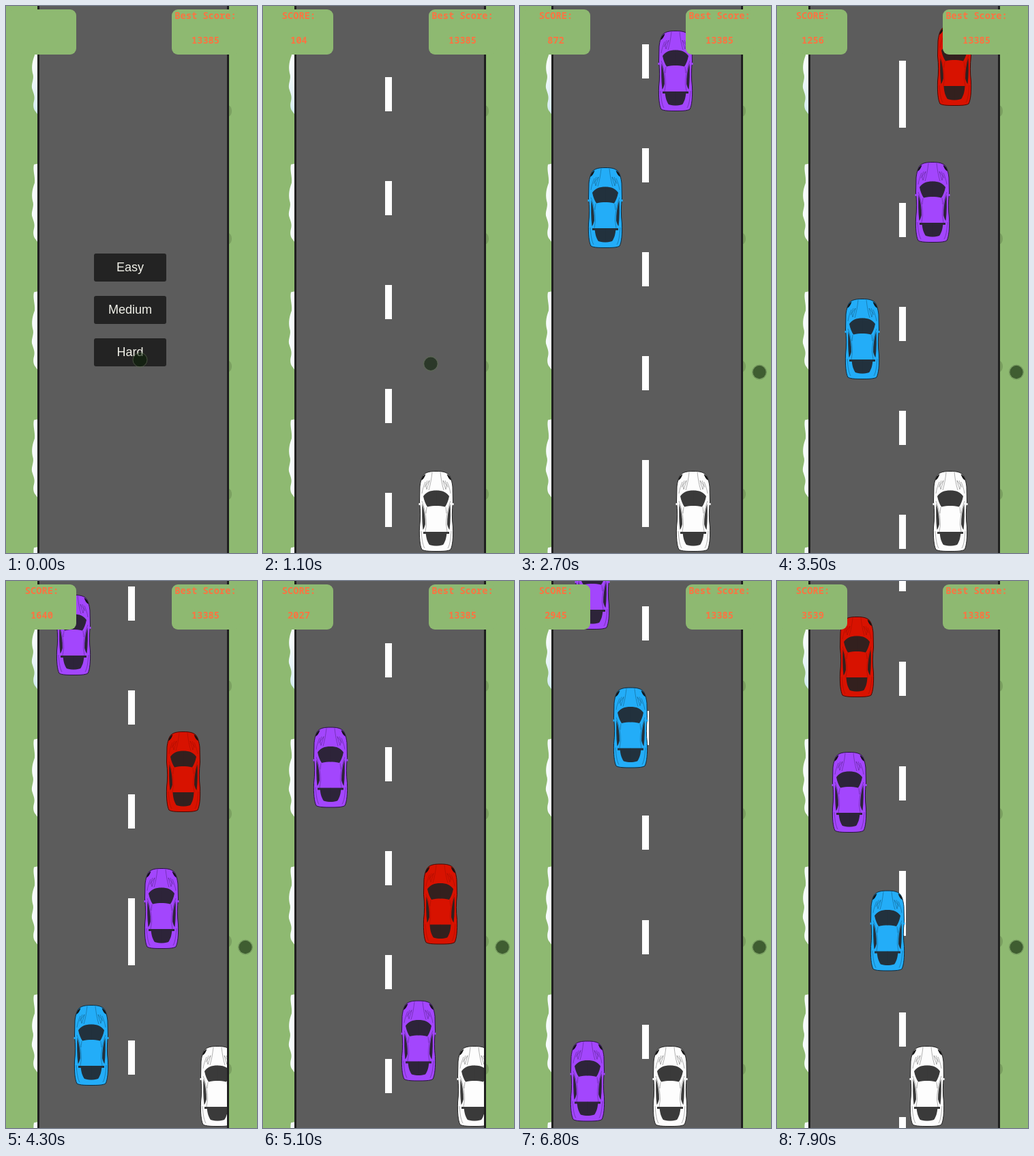
An HTML page with a canvas for the animation above (8000 ms loop, 368x800 px).

```html
<!DOCTYPE html>
<html lang="en">
<head>
<meta charset="utf-8">
<title>Road game</title>
<style>
html, body { margin: 0; width: 100%; height: 100%; overflow: hidden; background: #8eb971; }
canvas { display: block; width: 368px; height: 800px; }
</style>
</head>
<body>
<canvas id="stage" width="368" height="800"></canvas>
<script>
const ctx = document.getElementById('stage').getContext('2d');
const LOOP = 8000, START = 883, FPS = 60;
const GRASS = '#8eb971', ROAD = '#5c5c5c', EDGE = '#1f1f1f';
const MONO = 'bold 13.7px "Noto Sans Mono", "DejaVu Sans Mono", monospace';
const SANS = '18px "Liberation Sans", Arial, sans-serif';

const BLUE = { body: '#23adf8', glass: '#22313d', line: '#0b2b40' };
const PURPLE = { body: '#a346fd', glass: '#2d2439', line: '#2a1142' };
const RED = { body: '#d81200', glass: '#33201e', line: '#4a0800', plain: true };
const WHITE = { body: '#fdfdfd', glass: '#3a3a3a', line: '#222' };

// Rivals: paint, x on the first pass, x after coming round again
const RIVALS = [[BLUE, 100, 137], [PURPLE, 203, 81], [RED, 235, 92], [PURPLE, 74, 74]];

// Right half of a car, measured from the middle of its nose
const SHAPE = {
  body: new Path2D('M0 .5C9 .5 14 1.5 18 5C21.5 9 23 15 24 23L24.5 45C23 58 23 70 24.5 82C25 98 24 109 21 115C17 117.5 8 117.5 0 117.5C-8 117.5 -17 117.5 -21 115C-24 109 -25 98 -24.5 82C-23 70 -23 58 -24.5 45L-24 23C-23 15 -21.5 9 -18 5C-14 1.5 -9 .5 0 .5Z'),
  lamp: new Path2D('M15.5 4.5C19 6 21 9 22 14C19 12.5 17 9 15.5 4.5Z'),
  front: new Path2D('M-.2 28.5C9 28.5 15 31 19 37C17.5 44 15.5 49 13 52.5C8 51.3 4 51 -.2 51Z'),
  side: new Path2D('M20.5 48C21 60 21 74 19.5 86C18.5 85 17 82 16 78C16 68 17.5 57 20.5 48Z'),
  rear: new Path2D('M-.2 89H15.5C15 98 13 104 10 108C6 109.5 3 109.5 -.2 109.5Z'),
  hood: new Path2D('M6 2C7 11 8.5 20 11 28M10 14L15 21L14 27L11 18ZM13 14L17 24M16 16C18 21 20 26 21 33'),
  seams: new Path2D('M21 44C18 52 15 62 14.5 78L16 89M14 53L15 62M22 88C21 100 20 108 17 113')
};

const clamp = (v, lo, hi) => Math.min(hi, Math.max(lo, v));

function box(x, y, w, h, r, fill) {
  ctx.fillStyle = fill;
  ctx.beginPath();
  ctx.roundRect(x, y, w, h, r);
  ctx.fill();
}

function label(text, x, y, font, fill) {
  ctx.font = font;
  ctx.fillStyle = fill;
  ctx.textAlign = 'center';
  ctx.fillText(text, x, y);
}

function drawCar(x, y, paint) {
  ctx.save();
  ctx.translate(x + 25, y);
  ctx.lineWidth = 1;
  ctx.strokeStyle = paint.line;
  ctx.fillStyle = paint.body;
  ctx.fill(SHAPE.body);
  ctx.stroke(SHAPE.body);
  for (const flip of [1, -1]) {
    ctx.save();
    ctx.scale(flip, 1);
    ctx.fillStyle = '#151515';
    ctx.fill(SHAPE.lamp);
    ctx.globalAlpha = paint.plain ? 0.3 : 0.5;
    ctx.lineWidth = 0.7;
    ctx.stroke(SHAPE.hood);
    ctx.stroke(SHAPE.seams);
    ctx.globalAlpha = 1;
    ctx.fillStyle = paint.glass;
    for (const part of ['front', 'side', 'rear']) ctx.fill(SHAPE[part]);
    if (!paint.plain) {
      ctx.fillRect(15, 89, 4, 3);
      ctx.fillStyle = paint.body;
      ctx.fillRect(23.5, 47, 2, 3);
    }
    ctx.restore();
  }
  ctx.restore();
}

function drawBank(y) {
  const g = ctx.createLinearGradient(0, y, 0, y + 113);
  g.addColorStop(0, '#f6fbfb');
  g.addColorStop(0.5, '#dceff4');
  g.addColorStop(1, '#a9d8f3');
  ctx.fillStyle = g;
  ctx.save();
  ctx.translate(0, y);
  ctx.beginPath();
  ctx.moveTo(46, 0);
  ctx.lineTo(41, 1);
  ctx.bezierCurveTo(39, 10, 43, 18, 42, 28);
  ctx.bezierCurveTo(39, 36, 37, 44, 39, 54);
  ctx.bezierCurveTo(42, 62, 37, 68, 38, 76);
  ctx.bezierCurveTo(40, 83, 43, 88, 41, 95);
  ctx.bezierCurveTo(39, 102, 41, 108, 43, 110);
  ctx.lineTo(46, 114);
  ctx.fill();
  ctx.restore();
}

function drawGround() {
  ctx.fillStyle = GRASS;
  ctx.fillRect(0, 0, 368, 800);
  for (let i = 0; i < 5; i++) {
    drawBank(44 + i * 186.8);
    ctx.fillStyle = '#7a9f60';
    ctx.beginPath();
    ctx.ellipse(326, 153.5 + i * 186.8, 5, 8, 0, 0, 7);
    ctx.fill();
  }
  ctx.fillStyle = EDGE;
  ctx.fillRect(46, 0, 281, 800);
  ctx.fillStyle = ROAD;
  ctx.fillRect(49, 0, 275, 800);
}

// Replays the game up to the given tick
function play(ticks) {
  const game = { score: 0, dashes: [], cars: [], x: 229 };
  for (let i = 0; i < 7; i++) game.dashes.push(152 * i);
  RIVALS.forEach((r, i) => game.cars.push({ paint: r[0], x: r[1], next: r[2], y: -200 * (i + 1) }));
  for (let n = 0; n < ticks; n++) {
    const speed = game.score < 2000 ? 8 : 9;
    game.score += speed;
    game.dashes = game.dashes.map(y => y + speed >= 816 ? -152 : y + speed);
    for (const car of game.cars) {
      car.y += speed / 2;
      if (car.y >= 916) {
        car.y = -200;
        car.x = car.next;
      }
    }
  }
  game.x += 8 * clamp(ticks - 178, 0, 7) - 9 * clamp(ticks - 343, 0, 10);
  return game;
}

function drawGame(game) {
  ctx.save();
  ctx.beginPath();
  ctx.rect(49, 0, 275, 800);
  ctx.clip();
  ctx.fillStyle = '#fff';
  for (const y of game.dashes) ctx.fillRect(179, y, 10, 50);
  for (const car of game.cars) drawCar(car.x, car.y, car.paint);
  drawCar(game.x, 680, WHITE);
  ctx.restore();
}

function drawMenu() {
  ['Easy', 'Medium', 'Hard'].forEach((name, i) => {
    const y = 362 + 62 * i;
    box(129, y, 106, 41, 3, '#232323');
    label(name, 182, y + 26, SANS, '#f2f2ea');
  });
}

function drawScores(score) {
  const ink = '#fa7442';
  box(3, 5, 100, 66, 9, GRASS);
  box(243, 5, 100, 66, 9, GRASS);
  if (score !== null) {
    label('SCORE:', 52.5, 19, MONO, ink);
    label(score, 52.5, 55, MONO, ink);
  }
  label('Best Score:', 292.5, 19, MONO, ink);
  label('13385', 292.5, 55, MONO, ink);
}

function drawPointer(t) {
  const p = clamp((t - 950) / 400, 0, 1);
  const k = p * p * (3 - 2 * p);
  ctx.beginPath();
  ctx.arc(196.5 + 154.5 * k, 517.5 + 18 * k, 9.7, 0, 7);
  ctx.fillStyle = 'rgba(10,32,6,.6)';
  ctx.fill();
  ctx.beginPath();
  ctx.arc(196.5 + 154.5 * k, 517.5 + 18 * k, 10.5, 0, 7);
  ctx.strokeStyle = 'rgba(90,115,75,.55)';
  ctx.lineWidth = 1;
  ctx.stroke();
}

function draw(t) {
  const ticks = Math.floor((t - START) * FPS / 1000 + 0.1);
  const game = ticks < 0 ? null : play(ticks);
  drawGround();
  if (game) drawGame(game);
  else drawMenu();
  drawScores(game ? game.score : null);
  drawPointer(t);
}

const begin = performance.now();
function frame() {
  draw((performance.now() - begin) % LOOP);
  requestAnimationFrame(frame);
}
frame();
</script>
</body>
</html>
```
